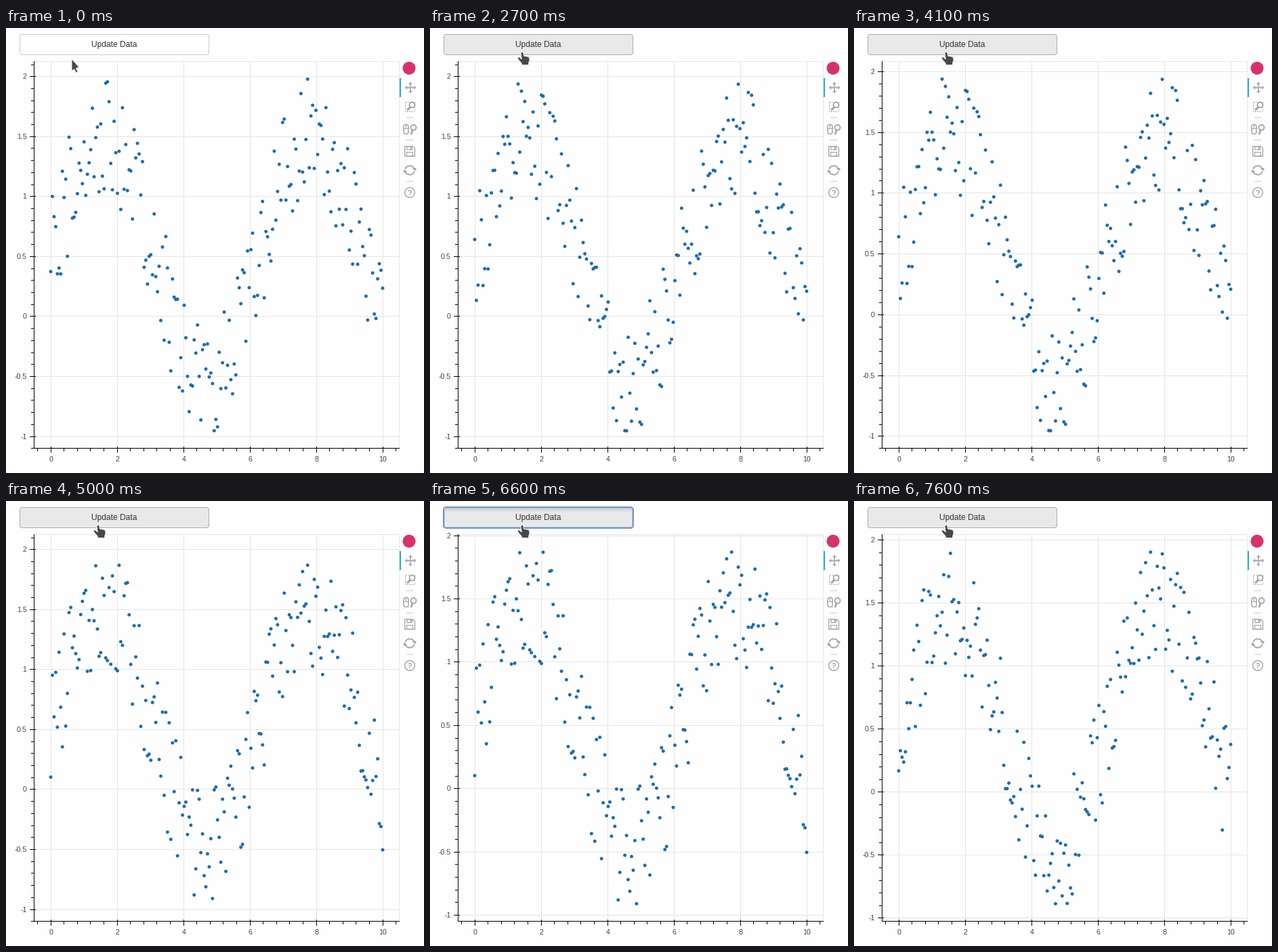
A matplotlib script that plays this animation: 617x657 px, repeating every 8 s.

```python
import numpy as np
import matplotlib.pyplot as plt
from matplotlib.animation import FuncAnimation
from matplotlib.collections import LineCollection
from matplotlib.patches import Arc, Circle, FancyBboxPatch, Polygon

W, H, DPI = 617, 657, 64
PX = 72 / DPI                     # points per pixel
LEFT, RIGHT, TOP, BOTTOM = 41.5, 580.5, 49.5, 620.5
STEP_MS, LOOP_MS = 100, 8000
ICON, GRID, PAPER = "#a1a6a9", "#e5e5e5", "#fefefe"

plt.rcParams["path.snap"] = False
plt.rcParams["font.family"] = "Liberation Sans"

fig = plt.figure(figsize=(W / DPI, H / DPI), dpi=DPI, facecolor=PAPER)
ax = fig.add_axes([0, 0, 1, 1])
ax.set_xlim(0, W)
ax.set_ylim(H, 0)
ax.axis("off")

# Four noisy sine waves, drawn from one random stream
rng = np.random.RandomState(42)
xs = np.linspace(0, 10, 200)
waves = [np.sin(xs) + rng.random_sample(200) for _ in range(4)]


# --- helpers -------------------------------------------------------------
def line(points, color=ICON, width=1.0, z=2, **kw):
    x, y = zip(*points)
    kw.setdefault("solid_capstyle", "butt")
    return ax.plot(x, y, color=color, lw=width * PX, zorder=z, **kw)[0]


def poly(points, color=ICON, edge="none", width=0.0, z=2):
    return ax.add_patch(Polygon(points, closed=True, fc=color, ec=edge,
                                lw=width * PX, joinstyle="round", zorder=z))


def circle(x, y, r, fill="none", edge=ICON, width=1.0, z=2):
    return ax.add_patch(Circle((x, y), r, fc=fill, ec=edge, lw=width * PX, zorder=z))


def box(x0, y0, x1, y1, r=0.01, fill="none", edge=ICON, width=1.0, z=2, **kw):
    style = f"round,pad=0,rounding_size={r}"
    return ax.add_patch(FancyBboxPatch((x0, y0), x1 - x0, y1 - y0, boxstyle=style,
                                       fc=fill, ec=edge, lw=width * PX, zorder=z, **kw))


def label(x, y, s, size=10.67, color="#444444", ha="center", **kw):
    return ax.text(x, y, s, fontsize=size * PX, color=color, ha=ha,
                   va="baseline", zorder=4, **kw)


def segments(color, z):
    group = LineCollection([], colors=color, linewidths=PX, zorder=z, capstyle="butt")
    ax.add_collection(group, autolim=False)
    return group


def crisp(v):
    return np.floor(v) + 0.5


def x_pix(x):
    return LEFT + (np.asarray(x) + 0.5) * (RIGHT - LEFT) / 11


def y_scale(wave):
    """Map data to pixels so the wave fills the plot with 5% padding."""
    lo, hi = wave.min(), wave.max()
    pad = 0.05 * (hi - lo)
    lo, hi = lo - pad, hi + pad
    return lambda y: BOTTOM - (np.asarray(y) - lo) / (hi - lo) * (BOTTOM - TOP)


# --- plot frame and x axis -----------------------------------------------
box(LEFT, TOP, RIGHT, BOTTOM, edge=GRID, z=1)
for i in range(-1, 27):
    x = crisp(x_pix(i * 0.4))
    if i % 5:
        line([(x, 620.5), (x, 625)], "black", z=3)
    else:
        line([(x, TOP), (x, BOTTOM)], GRID, z=1)
        line([(x, 618), (x, 627)], "black", z=3)
        label(x, 640.5, f"{i * 0.4:g}")
line([(41, BOTTOM), (581, BOTTOM)], "black", z=3)
line([(LEFT, 49), (LEFT, 621)], "black", z=3)

# --- y axis and points, placed per frame ---------------------------------
majors = np.arange(-2, 5) / 2
minors = np.arange(-12, 23) / 10
y_grid = segments(GRID, 1)
y_ticks = segments("black", 3)
y_labels = [label(30.5, 0, f"{v:g}", ha="right") for v in majors]
dots = ax.scatter(x_pix(xs), x_pix(xs), s=np.full(xs.size, (5 * PX) ** 2),
                  c="#1d6cb0", linewidths=0, zorder=5)

# --- button ---------------------------------------------------------------
button = box(20.5, 9.5, 299.5, 39.5, r=4, fill="white", edge="#cccccc")
focus = [box(19.5, 8.5, 300.5, 40.5, r=4.5, edge="#7d9fd6", z=3),
         box(20.5, 9.5, 299.5, 39.5, r=4, edge="#6f8cbc", z=3),
         box(21.5, 10.5, 298.5, 38.5, r=3, edge="#b9c8e0", z=3)]
for d in range(5):
    focus.append(line([(22, 11.5 + d), (298, 11.5 + d)], "black", z=2,
                      alpha=0.1 * (1 - d / 5)))
label(160, 28, "Update Data", size=12, color="#333333")


# --- toolbar --------------------------------------------------------------
def toolbar():
    circle(595, 59.3, 9.5, fill="#d6336c", edge="none")
    line([(582, 74), (582, 102)], "#26aae1", 2)
    for y in (132.5, 165.5, 226.5):
        line([(591, y), (601, y)], "#cccccc")

    # pan
    line([(591, 88), (603, 88)], width=1.6)
    line([(597, 82), (597, 94)], width=1.6)
    for dx, dy in ((1, 0), (-1, 0), (0, 1), (0, -1)):
        bx, by = 597 + 5 * dx, 88 + 5 * dy
        poly([(597 + 8.3 * dx, 88 + 8.3 * dy),
              (bx + 3 * dy, by + 3 * dx), (bx - 3 * dy, by - 3 * dx)])

    # box zoom
    box(589.5, 109.5, 603.5, 123.5, linestyle=(0, (2, 1.5)))
    line([(597, 116.5), (592, 121.5)], PAPER, 5)
    line([(597, 116.5), (592, 121.5)], width=3)
    circle(599.5, 113.5, 4, fill=PAPER, width=1.8)

    # wheel zoom
    box(587, 142.5, 594, 156.5, r=3, width=1.5)
    line([(590.5, 142.5), (590.5, 148)], width=1.2)
    line([(587, 148.5), (594, 148.5)], width=1)
    line([(600, 150.5), (598, 157)], width=2.8)
    circle(601.5, 147, 4, fill=PAPER, width=1.8)

    # save
    poly([(588.7, 174.7), (600.5, 174.7), (603.5, 177.7), (603.5, 189.3), (588.7, 189.3)],
         "none", ICON, 1.3)
    box(592, 174.7, 599.5, 179.5, width=1.2)
    line([(597.5, 175), (597.5, 179)], width=1.6)
    box(591.5, 183.5, 600.5, 189.3, width=1.2)

    # reset
    for start, stop in ((195, 340), (15, 160)):
        ax.add_patch(Arc((596, 210), 14, 13, theta1=start, theta2=stop,
                         ec=ICON, lw=1.9 * PX, zorder=2))
    poly([(600, 207), (606, 207), (603.8, 211.5)])
    poly([(592, 213), (586, 213), (588.2, 208.5)])

    # help
    circle(596, 243, 7.3, width=1.4)
    label(596, 247, "?", size=11, color=ICON, weight="bold")


toolbar()

# --- pointers -------------------------------------------------------------
arrow = poly([(97, 45.5), (97, 63.5), (100.5, 60.8), (103.6, 66.2), (106.2, 64.7),
              (103.4, 59.6), (107.8, 58)], "#484848", "white", 0.8, z=8)
HAND = np.array([(134, 36.6), (135.8, 35.2), (137.8, 36.5), (138.5, 41.2),
                 (144.5, 42.2), (146.7, 43.6), (147, 48), (145.7, 51.2),
                 (145.7, 54.6), (135.6, 54.6), (135, 51.8), (131.6, 48),
                 (129, 44.4), (130.3, 42.7), (132.5, 43.5), (135.2, 46)])
hand = poly(HAND, "#484848", "white", 0.8, z=8)


# --- timeline -------------------------------------------------------------
def wave_index(t):
    return sum(t >= change for change in (2700, 5000, 7200))


def range_index(t):
    """The axis falls back to the first range just after a later update."""
    if 3500 <= t < 5000:
        return 1
    if 5200 <= t < 7200:
        return 2
    return 3 if t >= 7600 else 0


def draw(frame):
    t = frame * STEP_MS
    to_pix = y_scale(waves[range_index(t)])

    dots.set_offsets(np.column_stack([x_pix(xs), to_pix(waves[wave_index(t)])]))
    rows = crisp(to_pix(majors))
    y_grid.set_segments([[(LEFT, y), (RIGHT, y)] for y in rows])
    ticks = [[(35, y), (44, y)] for y in rows]
    ticks += [[(37, y), (41.5, y)] for y in crisp(to_pix(minors)) if TOP <= y <= BOTTOM]
    y_ticks.set_segments(ticks)
    for text, y in zip(y_labels, rows):
        text.set_y(y + 3.5)

    hover = t >= 700
    button.set_facecolor("#e9e9e9" if hover else "white")
    button.set_edgecolor("#adadad" if hover else "#cccccc")
    pressed = 3900 <= t < 4100 or 6600 <= t < 6800
    for part in focus:
        part.set_visible(pressed)

    arrow.set_visible(not hover)
    hand.set_visible(hover)
    hand.set_xy(HAND + ((-18, 4) if t < 800 else (0, 0)))
    return [dots, y_grid, y_ticks, *y_labels, button, *focus, arrow, hand]


anim = FuncAnimation(fig, draw, frames=LOOP_MS // STEP_MS, interval=STEP_MS,
                     repeat=True, repeat_delay=0, blit=False)
plt.show()
```
